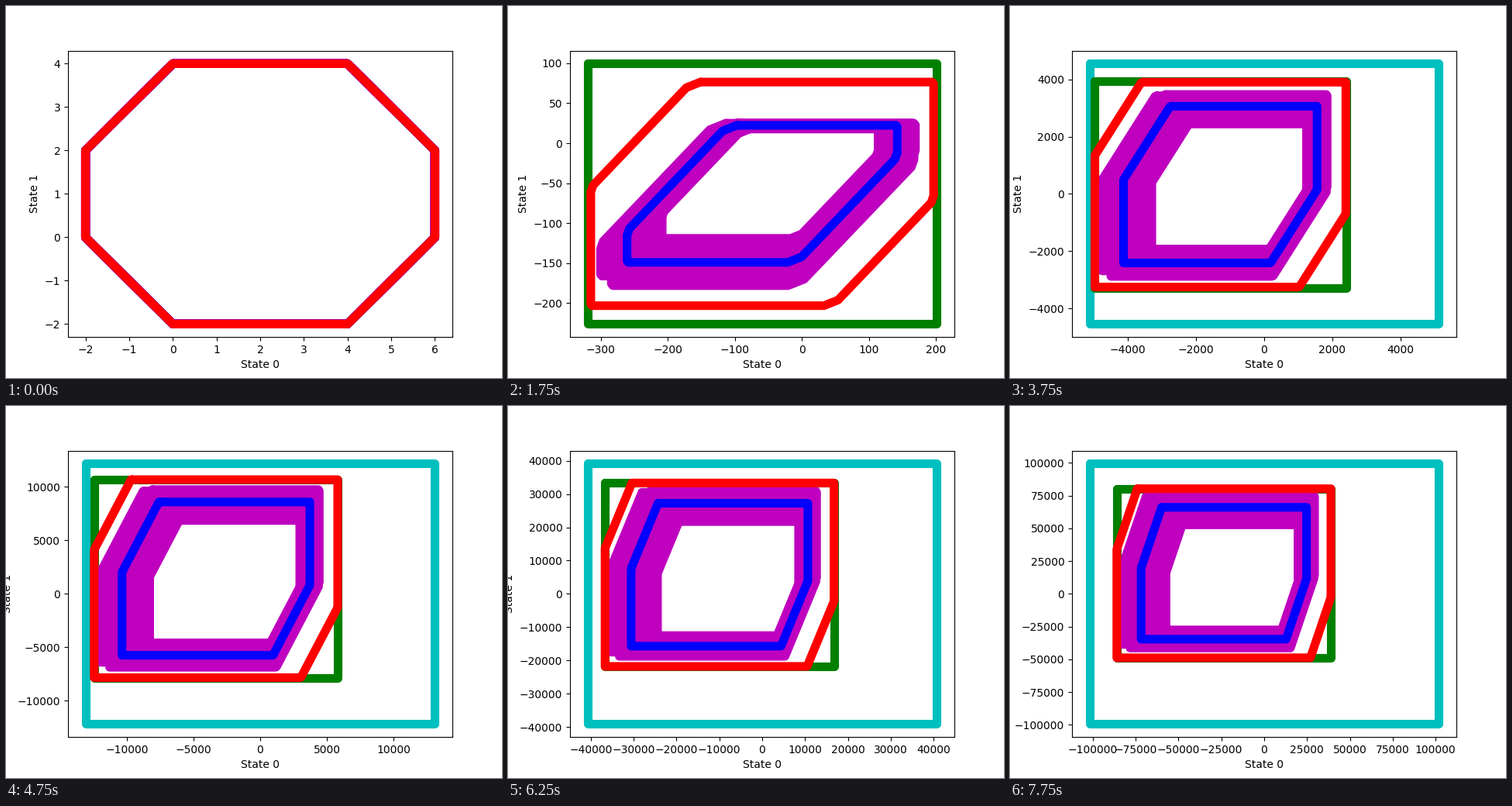
A matplotlib script that plays this animation: 640 by 480 pixels, repeating every 8000 ms.

```python
"""Growth of a reachable set: sampled sets, their mean and three outer bounds."""
import numpy as np
import matplotlib.pyplot as plt
from matplotlib.animation import FuncAnimation

STEPS = 32
GREEN_FROM, CYAN_FROM = 5, 10
LAYERS = 11  # sampled outlines between the smallest and largest set

# Boxes are left, right, bottom, top; these scale the mean to the samples
OUTWARD = np.array([-1, 1, -1, 1])
SMALL = np.full(4, 0.8)
WIDE = np.array([1.152, 1.19, 1.115, 1.12])
DEEP = np.array([1.09, 1.175, 1.195, 1.135])


def mean_box(k):
    side = 4 * k**1.5
    left = 2 + side + 0.077 * k**4
    right = 6 + side + 0.026 * k**4
    bottom = 2 + max(14 * k, 0.1164 * k**3.67)
    top = 4 + max(2.2 * k, 0.075 * k**4 - 3.3 * k**2)
    return np.array([left, right, bottom, top]) * OUTWARD


def red_box(k):
    return mean_box(k) + (0.015 * k**4 + 0.37 * k**2) * OUTWARD


def green_box(k):
    return red_box(k) + np.array([5, 5, 23, 23]) * OUTWARD


def cyan_box(k):
    core = 0.00135 * k**5 + 0.0647 * k**4
    x, y = core + 3.7 * k**2, core + 1.1 * k**2
    return np.array([x, x, y, y]) * OUTWARD


def slants(k):
    """Sizes of the slanted edges, clockwise from the top right corner."""
    return np.array([(2, 2), (0.5 * k, 1.2 * k),
                     (2 + 0.4 * k**3, 2 + 0.05 * k**4), (3 * k, k)])


def outline(box, cuts=np.zeros((4, 2))):
    """Centrally symmetric polygon filling a box."""
    left, right, bottom, top = box
    (tx, ty), a, b, c = cuts
    flat, upright = (right - left, top - bottom) - cuts.sum(axis=0)
    half = np.array([(flat, 0), (tx, -ty), (0, -upright), -a, -b, -c])
    start = (right - tx - flat, top)
    return np.vstack([start, start + np.cumsum(np.vstack([half, -half]), axis=0)])


fig, ax = plt.subplots(figsize=(6.4, 4.8), dpi=100)


def draw(points, color):
    ax.plot(points[:, 0], points[:, 1], color=color, lw=8,
            solid_joinstyle="round", solid_capstyle="round")


def draw_samples(box, cuts, spread):
    for largest in (WIDE, DEEP):
        for mix in np.linspace(0, 1, LAYERS):
            scale = 1 + spread * (SMALL + mix * (largest - SMALL) - 1)
            draw(outline(box * scale, cuts * scale.mean()), "m")


def update(k):
    ax.clear()
    box, cuts = mean_box(k), slants(k)
    if k >= CYAN_FROM:
        draw(outline(cyan_box(k)), "c")
    if k >= GREEN_FROM:
        draw(outline(green_box(k)), "g")
    draw_samples(box, cuts, min(1, k / 4))
    draw(outline(box, cuts), "b")
    draw(outline(red_box(k), cuts), "r")
    ax.set_xlabel("State 0")
    ax.set_ylabel("State 1")


anim = FuncAnimation(fig, update, frames=STEPS, interval=250, repeat=True)
plt.show()
```
